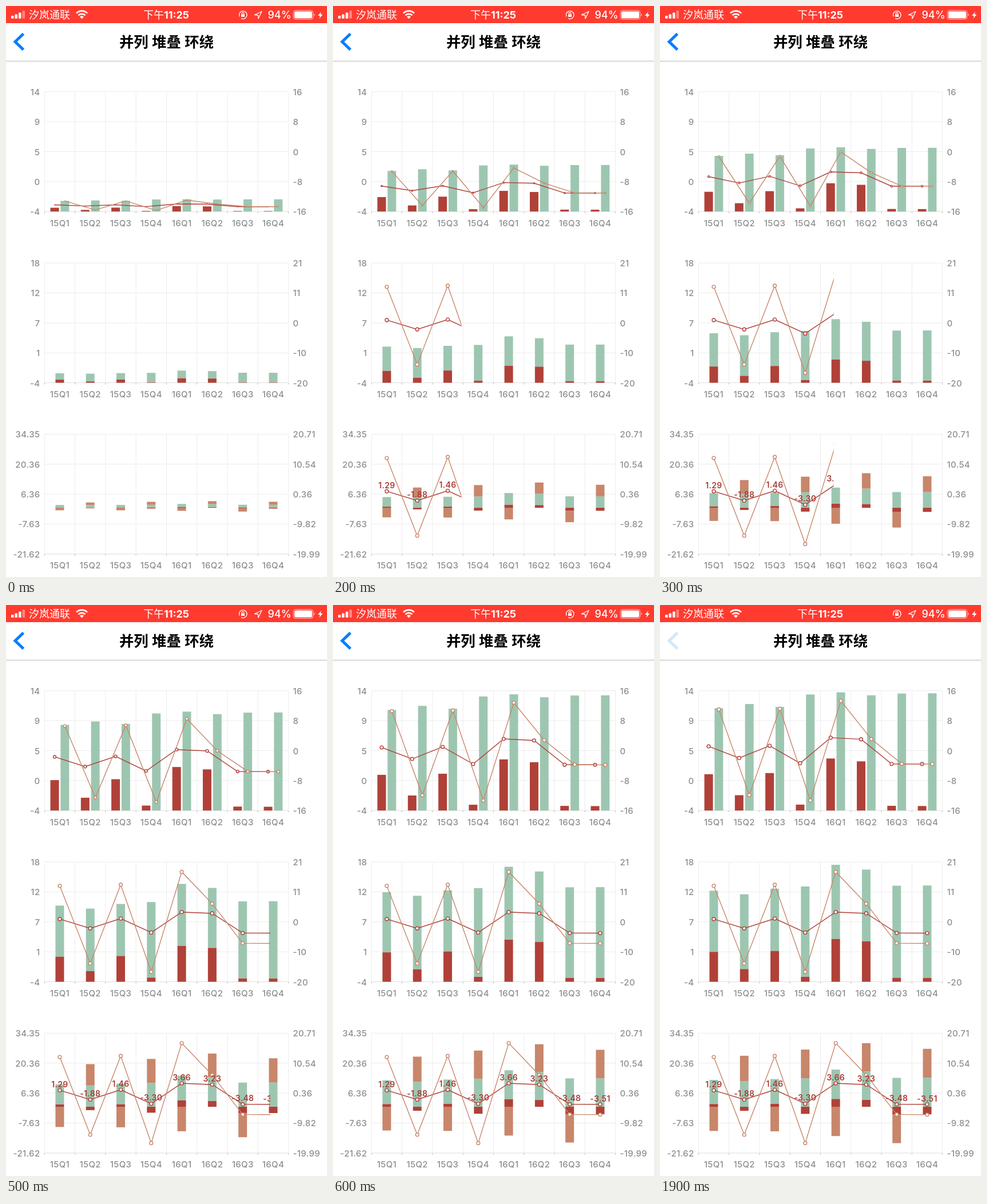
Recreate the animation shown at these times as an HTML page. Size 561 by 998 pixels, loop 2000 ms.

```html
<!DOCTYPE html>
<html lang="zh-CN">
<head>
<meta charset="utf-8">
<title>图表</title>
<style>
  html, body { margin: 0; width: 100%; height: 100%; overflow: hidden; background: #fff; }
  svg { display: block; width: 100%; height: 100%; font-family: Inter, "Noto Sans CJK SC", "Noto Sans CJK", sans-serif; }
  .axis { font-size: 15px; font-weight: 500; fill: #8c8f8f; letter-spacing: .35px; }
  .value { font-size: 14px; font-weight: 600; fill: #a93d35; letter-spacing: .3px; text-anchor: middle; }
  .status { font-size: 18px; font-weight: 500; fill: #fff; }
  .title { font-size: 25.4px; font-weight: 600; fill: #000; text-anchor: middle; }
</style>
</head>
<body>
<svg id="stage" viewBox="0 0 561 998">
  <defs><clipPath id="reveal"><rect id="wipe" x="0" y="400" width="0" height="598"/></clipPath></defs>
  <rect width="561" height="998" fill="#fff"/>
  <rect width="561" height="30" fill="#ff3b30"/>
  <g fill="#fff">
    <rect x="9" y="17" width="4.5" height="5" rx="1"/>
    <rect x="15.5" y="14.5" width="4.5" height="7.5" rx="1"/>
    <rect x="22" y="11.5" width="4.5" height="10.5" rx="1"/>
    <rect x="28.5" y="8" width="4.5" height="14" rx="1" opacity=".4"/>
    <path d="M132.5 22.5l-3.6-3.8a5 5 0 0 1 7.2 0z"/>
    <path d="M545 17l6-7-1.3 4.800h3.800l-6 7.200 1.300-5z"/>
    <rect x="504" y="9.500" width="31" height="12" rx="2"/>
    <path d="M538.300 13v5a2.700 2.700 0 0 0 0-5z" opacity=".6"/>
    <rect x="411" y="14.500" width="6" height="4.500" rx=".5"/>
  </g>
  <g fill="none" stroke="#fff">
    <path d="M126.500 16.300a8.500 8.500 0 0 1 12 0M123 12.600a13.500 13.500 0 0 1 19 0" stroke-width="2.700"/>
    <rect x="502.300" y="7.800" width="34.400" height="15.400" rx="3.500" stroke-width="1" opacity=".7"/>
    <path d="M412.300 14.500v-1.500a1.700 1.700 0 0 1 3.400 0v1.500M408 18.500a6.800 6.800 0 1 1 3 3.200" stroke-width="1.300"/>
    <path d="M447 9.500l-12.500 6 6 .500.500 6z" stroke-width="1.300" stroke-linejoin="round"/>
  </g>
  <text class="status" x="40" y="22">汐岚通联</text>
  <text class="status" x="240" y="22">下午<tspan font-weight="700">11:25</tspan></text>
  <text class="status" x="457.500" y="22">94%</text>
  <path id="back" d="M30.500 48.500L16 62.500l14.500 14" fill="none" stroke="#087dfd" stroke-width="5"/>
  <text class="title" x="280.500" y="72">并列 堆叠 环绕</text>
  <rect y="95.800" width="561" height="1.300" fill="#c4c4c4"/>
</svg>
<script>
const RED = '#b04138', GREEN = '#9dc6b1', BROWN = '#c8866b';
const LEFT = 67.3, RIGHT = 493.6, BAND = (RIGHT - LEFT) / 8, HEIGHT = 209.4, BAR = 15;
const quarters = ['15Q1', '15Q2', '15Q3', '15Q4', '16Q1', '16Q2', '16Q3', '16Q4'];
const growth = [1.29, -1.88, 1.46, -3.30, 3.66, 3.23, -3.48, -3.51];
const trend = [11.33, -11.95, 11.53, -13.4, 13.7, 3.28, -3.46, -3.52];
const volume = [11.25, 11.88, 11.44, 13.32, 13.65, 13.2, 13.47, 13.5];

const stage = document.getElementById('stage');
const wipe = document.getElementById('wipe');
const back = document.getElementById('back');
const center = i => LEFT + BAND * (i + .5);
const updaters = [];

function add(parent, tag, attrs, text) {
  const node = document.createElementNS('http://www.w3.org/2000/svg', tag);
  set(node, attrs);
  if (text !== undefined) node.textContent = text;
  parent.appendChild(node);
  return node;
}

function set(node, attrs) {
  for (const name in attrs) node.setAttribute(name, attrs[name]);
}

function drawGrid(top, leftLabels, rightLabels) {
  const bottom = top + HEIGHT;
  const line = (x1, y1, x2, y2, stroke) => add(stage, 'line', { x1, y1, x2, y2, stroke });
  for (let i = 0; i <= 8; i++) {
    const x = LEFT + BAND * i;
    line(x, top, x, bottom, '#ececec');
    line(x, bottom, x, bottom + 3, '#b5b5b5');
  }
  for (let i = 0; i < 5; i++) {
    const y = top + HEIGHT * i / 4;
    line(LEFT, y, RIGHT, y, i < 4 ? '#ececec' : '#dedede');
    add(stage, 'text', { class: 'axis', x: 59.5, y: y + 6, 'text-anchor': 'end' }, leftLabels[i]);
    add(stage, 'text', { class: 'axis', x: 501.5, y: y + 6 }, rightLabels[i]);
  }
  quarters.forEach((name, i) => add(stage, 'text',
    { class: 'axis', x: center(i), y: bottom + 25.3, 'text-anchor': 'middle' }, name));
}

// A bar spans two signed distances above its base and grows from that base.
function addBar(x, base, from, to, fill) {
  const node = add(stage, 'rect', { x: x - BAR / 2, width: BAR, fill });
  const high = Math.max(from, to), size = Math.abs(to - from);
  updaters.push(p => set(node, { y: base - high * p, height: size * p }));
}

function addLine(parent, points, color, base) {
  const path = add(parent, 'polyline', { fill: 'none', stroke: color, 'stroke-width': 1.4 });
  const dots = points.map(([x]) => add(parent, 'circle',
    { cx: x, fill: '#fff', stroke: color, 'stroke-width': 1.4 }));
  const pose = p => {
    const ys = points.map(([, y]) => base + (y - base) * p);
    set(path, { points: points.map(([x], i) => `${x},${ys[i]}`).join(' ') });
    dots.forEach((dot, i) => set(dot, { cy: ys[i], r: 2.9 * p }));
  };
  pose(1);
  return pose;
}

function sideBySide() {
  const top = 149.8, base = top + HEIGHT, unit = 11.58, floor = 4.19, shift = 8.9;
  drawGrid(top, [14, 9, 5, 0, -4], [16, 8, 0, -8, -16]);
  quarters.forEach((_, i) => {
    addBar(center(i) - shift, base, 0, (growth[i] + floor) * unit, RED);
    addBar(center(i) + shift, base, 0, (volume[i] + floor) * unit, GREEN);
  });
  const points = (values, dx) => values.map((v, i) => [center(i) + dx, 255.4 - v * 6.42]);
  updaters.push(addLine(stage, points(growth, -shift), RED, base));
  updaters.push(addLine(stage, points(trend, shift), BROWN, base));
}

function revealedLines(zero) {
  const group = add(stage, 'g', { 'clip-path': 'url(#reveal)' });
  const points = values => values.map((v, i) => [center(i), zero - v * 5.13]);
  const lower = points(growth);
  addLine(group, lower, RED, 0);
  addLine(group, points(trend.map((v, i) => v + growth[i])), BROWN, 0);
  return { group, lower };
}

function stacked() {
  const top = 449.1, base = top + HEIGHT, unit = 9.5, floor = 4.21;
  drawGrid(top, [18, 12, 7, 1, -4], [21, 11, 0, -10, -20]);
  quarters.forEach((_, i) => {
    const lower = (growth[i] + floor) * unit;
    const upper = (Math.max(growth[i], 0) + volume[i] + floor) * unit;
    addBar(center(i), base, lower, upper, GREEN);
    addBar(center(i), base, 0, lower, RED);
  });
  revealedLines(555.5);
}

function aroundZero() {
  const top = 748.4, base = 877, unit = 3.752;
  drawGrid(top, ['34.35', '20.36', '6.36', '-7.63', '-21.62'],
    ['20.71', '10.54', '0.36', '-9.82', '-19.99']);
  quarters.forEach((_, i) => {
    const red = growth[i] * unit, size = volume[i] * unit;
    const green = Math.max(red, 0) + size;
    const start = i % 2 ? green : Math.min(red, 0);
    addBar(center(i), base, 0, red, RED);
    addBar(center(i), base, green - size, green, GREEN);
    addBar(center(i), base, start, start + (i % 2 ? size : -size), BROWN);
  });
  const { group, lower } = revealedLines(854.8);
  lower.forEach(([x, y], i) => add(group, 'text',
    { class: 'value', x, y: y - 5.3 }, growth[i].toFixed(2)));
}

function render(time) {
  const t = time % 2000;
  const step = Math.floor(t / 100);
  const progress = Math.min(1, .104 + .1465 * step);
  updaters.forEach(update => update(progress));
  set(wipe, { width: Math.min(561, 66 + 79.2 * step) });
  set(back, { stroke: t >= 1900 ? '#cfe8fb' : '#087dfd' });
}

function tick() {
  render(performance.now());
  requestAnimationFrame(tick);
}

sideBySide();
stacked();
aroundZero();
tick();
</script>
</body>
</html>
```
